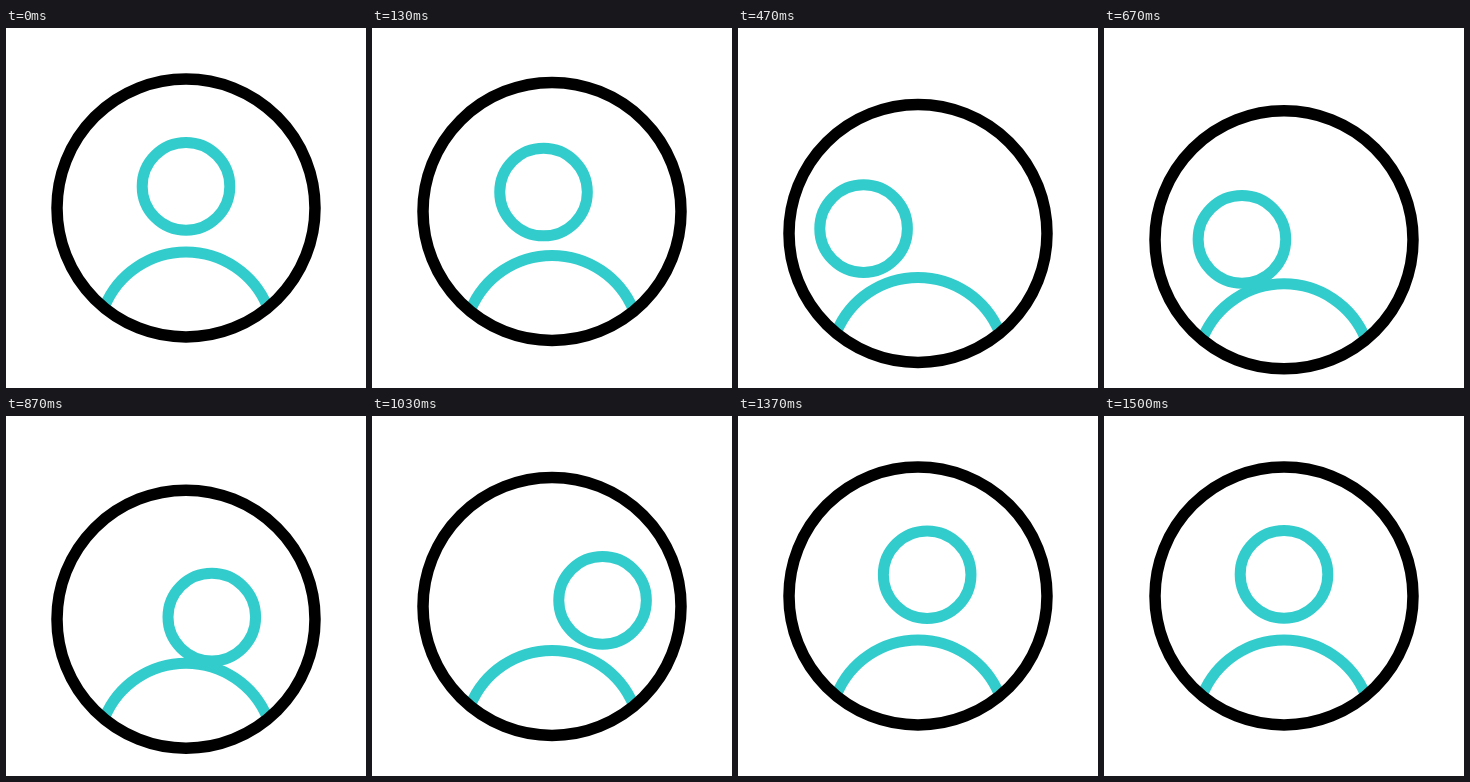
Write an HTML page that moves like this. It is 360x360 px and loops after 2 s.

```html
<!DOCTYPE html>
<html lang="en">
<head>
<meta charset="utf-8">
<title>Avatar</title>
<style>
  html, body { margin: 0; width: 100%; height: 100%; overflow: hidden; background: #fff; }
  svg { display: block; width: 100%; height: 100%; fill: none; stroke: #3cc; stroke-width: 11; }
  #ring { stroke: #000; stroke-width: 11.5; }
</style>
</head>
<body>
<svg viewBox="0 0 360 360">
  <g id="bust">
    <path d="M98.5 278.8A88 88 0 0 1 261.5 278.8"/>
    <circle id="ring" cx="180" cy="180" r="129"/>
  </g>
  <circle id="head" cx="180" cy="158.4" r="43.8"/>
</svg>
<script>
const LOOP = 2000, FPS = 30, LAST_STEP = 45;
const LOWEST = 19.7, LEFTMOST = 16.7, RIGHTMOST = 30.2;

// Smooth progress from 0 to 1 between two steps
function ease(step, start, end) {
  const p = Math.min(1, Math.max(0, (step - start) / (end - start)));
  return p * p * (3 - 2 * p);
}

// Sinks until LOWEST, then rises back by the end step
function dip(step, depth, end) {
  return depth * (ease(step, 0, LOWEST) - ease(step, LOWEST, end));
}

// Swings left, across to the right, then back to the middle
function sway(step, left, right) {
  return -left * ease(step, 0, LEFTMOST)
    + (left + right) * ease(step, LEFTMOST, RIGHTMOST)
    - right * ease(step, RIGHTMOST, LAST_STEP);
}

function move(id, x, y) {
  document.getElementById(id).setAttribute("transform", `translate(${x} ${y})`);
}

function draw() {
  const time = performance.now() % LOOP;
  const step = Math.min(LAST_STEP, Math.floor(time * FPS / 1000 + 0.11));
  move("bust", 0, dip(step, 31.9, 38));
  move("head", sway(step, 58.5, 51), dip(step, 53, 42));
  requestAnimationFrame(draw);
}
draw();
</script>
</body>
</html>
```
